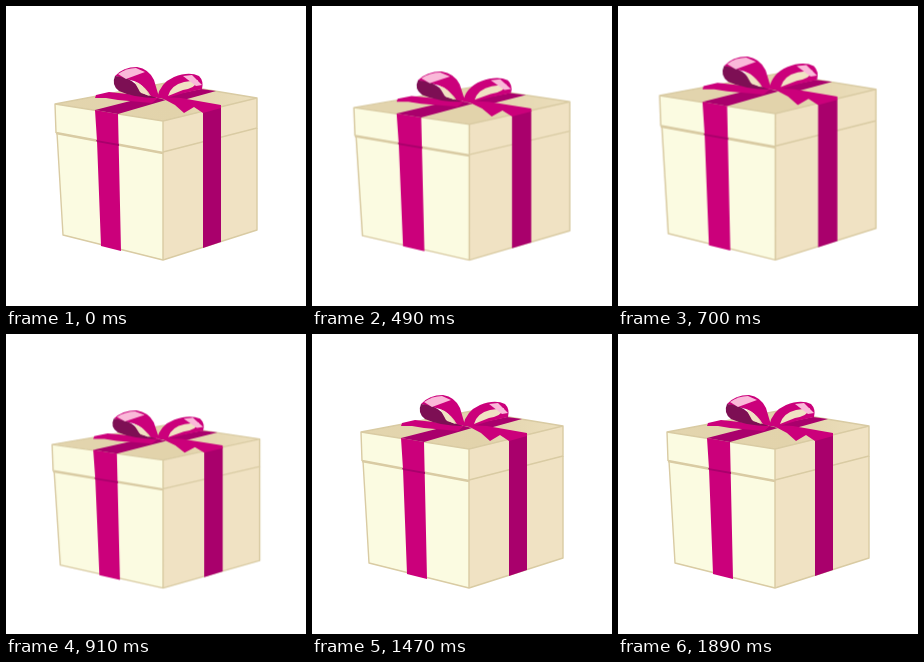
An HTML page that plays this animation: 300 by 300 pixels, repeating every 1.96 s.

```html
<!DOCTYPE html>
<html lang="en">
<head>
<meta charset="utf-8">
<title>Bouncing gift</title>
<style>
  html, body { margin: 0; width: 100%; height: 100%; overflow: hidden; background: #fff; }
  svg { display: block; width: 100vw; height: 100vh; }
  #gift { transform-box: view-box; transform-origin: 153px 255px; }
  .front { fill: #fbfbe1; }
  .side { fill: #f0e2c3; }
  .edge { fill: none; stroke: #d9cba3; stroke-width: 1.4; stroke-linejoin: round; }
  .seam { stroke-width: 2.6; }
  .pink { fill: #cb007b; }
  .deep { fill: #a9006c; }
  .dark { fill: #7d0f54; }
  .pale { fill: #fab9d9; }
</style>
</head>
<body>
<svg viewBox="0 0 300 300">
  <defs>
    <linearGradient id="top" x1="0" x2="1">
      <stop offset="0" stop-color="#e3d5ae"/>
      <stop offset=".6" stop-color="#e2d3ab"/>
      <stop offset="1" stop-color="#ecdfbd"/>
    </linearGradient>
  </defs>
  <g id="gift">
    <!-- body -->
    <path class="front" d="M51 126 157 146V254L57 229Z"/>
    <path class="side" d="M157 146 251 122V224L157 254Z"/>
    <path class="edge" d="M51 127 57 229 157 254 251 224V122M157 146V254"/>
    <!-- lid -->
    <path fill="url(#top)" d="M49 98 160 77 251 92 157 115Z"/>
    <path class="front" d="M49 98 157 115V146L50 127Z"/>
    <path class="side" d="M157 115 251 92V122L157 146Z"/>
    <path class="edge" d="M49 98 160 77 251 92 157 115ZM49 98 50 127M157 115V146L251 122V92"/>
    <path class="edge seam" d="M50 127 157 147"/>
    <!-- ribbons -->
    <path class="pink" d="M89 104 112 108 115 245 95 240 91 135Z"/>
    <path class="deep" d="M90 134 113 138V140L91 136Z"/>
    <path class="deep" d="M89 104 144 90 160 94 112 108Z"/>
    <path class="deep" d="M152 92 195 83 210 85 174 95Z"/>
    <path class="deep" d="M197 106 215 101V236L197 242Z"/>
    <path class="pink" d="M90 89 103 86 122 88 152 92 146 97 112 94 100 92 89 92Z"/>
    <path class="pink" d="M154 91 175 92 215 99V102L197 107 188 101 178 107 169 99Z"/>
    <!-- bow -->
    <path class="pink" d="M109 70Q117 61 131 61 143 63 148 74L153 91 146 92Q140 80 128 75Z"/>
    <path class="dark" d="M109 70Q105 79 113 85 128 92 151 92L135 87Q130 72 109 70Z"/>
    <path class="side" d="M128 75Q138 78 143 90L134 86Z"/>
    <path class="pale" d="M112 68Q120 62 130 62L139 66 120 73Z"/>
    <path class="pink" d="M151 92Q154 77 168 71 183 65 193 70 198 75 196 83L178 87 161 92Z"/>
    <path class="side" d="M162 90Q165 79 178 76L192 74Q190 82 177 84Z"/>
    <path class="pale" d="M177 70 186 69 196 79 190 80Z"/>
  </g>
</svg>
<script>
  const LOOP = 1960, STEP = 70, START = 280, END = 1190;

  const wave = (time, peak, period) => Math.cos(2 * Math.PI * (time - peak) / period);

  // Damped wobble: height follows width with a lag and a longer period.
  function pose(time) {
    const fade = time < START ? 0 : Math.max(0, (END - time) / (END - START));
    const x = 1 + fade * (.11 + .14 * wave(time, 375, 420));
    const y = 1 + fade * (-.03 + .27 * wave(time, 615, 500));
    return {
      offset: time / LOOP,
      transform: `scale(${x}, ${y})`,
      easing: 'steps(1, end)'
    };
  }

  const frames = [];
  for (let time = 0; time <= LOOP; time += STEP) frames.push(pose(time));

  document.getElementById('gift').animate(frames, { duration: LOOP, iterations: Infinity });
</script>
</body>
</html>
```
